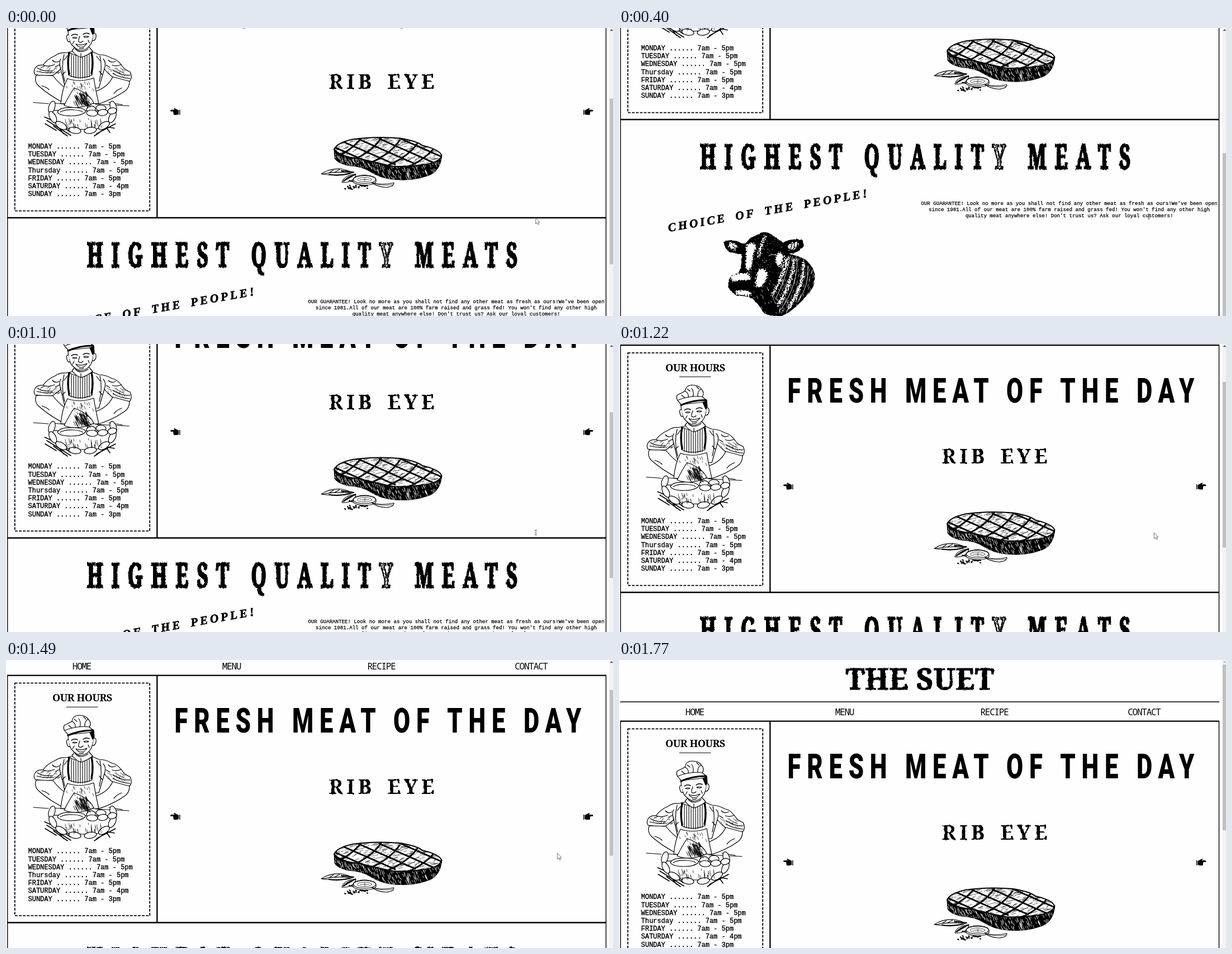
Write an HTML page that moves like this. It is 1086 px wide and 516 px high and loops after 2.5 s.

```html
<!DOCTYPE html>
<html lang="en">
<head>
<meta charset="utf-8">
<title>Butcher shop</title>
<style>
@property --s { syntax: "<number>"; inherits: true; initial-value: 0; }
html, body { margin: 0; width: 100%; height: 100%; overflow: hidden; background: #fefefe; }
svg { display: block; width: 1086px; height: 516px; animation: scroll 2500ms step-end infinite; }
.page { transform: translateY(calc(var(--s) * -1px)); }
.thumb { transform: translateY(calc(var(--s) * .557px)); }
.arrow { animation: arrow 2500ms step-end infinite; }
.beam { animation: beam 2500ms step-end infinite; }
.up { animation: up 2500ms step-end infinite; }

@keyframes scroll {
  0% { --s: 212.5 }
  6% { --s: 318.5 }
  11.2% { --s: 374 }
  16% { --s: 388.5 }
  38.8% { --s: 302.5 }
  44% { --s: 205 }
  48.8% { --s: 107.5 }
  54.4% { --s: 92 }
  59.6% { --s: 82 }
  65.2% { --s: 10 }
  70.8%, 100% { --s: 0 }
}
@keyframes arrow {
  0% { transform: translate(947.5px, 340px); opacity: 1 }
  6% { transform: translate(946.5px, 338px); opacity: 1 }
  11.2% { opacity: 0 }
  48.8% { transform: translate(957.5px, 338px); opacity: 1 }
  54.4% { transform: translate(968px, 341px); opacity: 1 }
  59.6% { transform: translate(986.5px, 346px); opacity: 1 }
  65.2%, 100% { opacity: 0 }
}
@keyframes beam {
  0% { opacity: 0 }
  11.2% { opacity: 1 }
  48.8%, 100% { opacity: 0 }
}
@keyframes up {
  0% { fill: #505050 }
  70.8%, 100% { fill: #b4b4b4 }
}

text { white-space: pre; stroke: #000; stroke-width: 0; }
.title { font: 900 52px "Noto Serif", serif; letter-spacing: .6px; stroke-width: 1; }
.nav { font: 500 16px "Noto Sans Mono", monospace; letter-spacing: -1.25px; }
.head { font: 700 18px "Noto Serif", serif; letter-spacing: -.4px; }
.hours { font: 400 12px "Liberation Mono", monospace; }
.fresh { font: 900 60.5px Roboto, sans-serif; letter-spacing: 15.1px; }
.cut { font: 600 36px "Noto Serif", serif; letter-spacing: 6.2px; word-spacing: 7px; }
.slab { font: 700 60px "Noto Serif", serif; letter-spacing: 26.2px; }
.script { font: italic 700 21px "Liberation Serif", serif; letter-spacing: 4.2px; word-spacing: 6px; }
.note { font: 400 9.125px "Liberation Mono", monospace; }
.hours text { stroke-width: .35; }
.note text { stroke-width: .25; }
.slab { stroke-width: 3.2; }
.script { stroke-width: .7; }
.mid { text-anchor: middle; }
.ink { fill: none; stroke: #000; stroke-linecap: round; stroke-linejoin: round; }
.ink.light, .light { stroke: #fefefe; }
.w { fill: #fefefe; }
.k { fill: #000; }
</style>
</head>
<body>
<svg viewBox="0 0 1086 516">
  <defs>
    <filter id="rough" color-interpolation-filters="sRGB">
      <feTurbulence type="fractalNoise" baseFrequency=".22" numOctaves="2" seed="4"/>
      <feDisplacementMap in="SourceGraphic" scale="4.5" xChannelSelector="R" yChannelSelector="G"/>
    </filter>
    <filter id="worn" color-interpolation-filters="sRGB">
      <feTurbulence type="fractalNoise" baseFrequency=".15" numOctaves="2" seed="9"/>
      <feDisplacementMap in="SourceGraphic" scale="3" xChannelSelector="R" yChannelSelector="G"/>
    </filter>
    <!-- Turns soft shapes into white grain -->
    <filter id="stipple" color-interpolation-filters="sRGB">
      <feGaussianBlur in="SourceGraphic" stdDeviation="3" result="soft"/>
      <feTurbulence type="fractalNoise" baseFrequency=".42" numOctaves="2" seed="3"/>
      <feComposite in="soft" operator="arithmetic" k2="1" k3="1" k4="-.85"/>
      <feColorMatrix values="0 0 0 0 1  0 0 0 0 1  0 0 0 0 1  0 0 0 12 -1"/>
    </filter>
    <pattern id="scribble" width="9" height="7" patternUnits="userSpaceOnUse">
      <rect width="9" height="7" fill="#fefefe"/>
      <path d="M0 6Q4 0 9 4M2 0L5 7" fill="none" stroke="#000" stroke-width="1.3"/>
    </pattern>
    <path id="top" d="M587 430Q592 418 620 412Q660 406 705 410Q735 415 745 423Q775 430 779 440Q778 452 750 457Q715 462 690 460Q660 453 630 446Q600 444 587 430Z"/>
    <path id="side" d="M587 430L588 446Q592 454 612 459Q637 460 652 470Q670 482 695 484Q728 487 755 477Q777 470 780 440Q760 425 690 425Z"/>
    <path id="cow" d="M235 376Q245 372 250 369Q260 362 273 370L294 385Q304 377 327 379Q333 384 329 393Q320 404 304 404Q316 408 330 412Q346 424 350 440Q352 455 346 466Q338 479 322 494Q306 510 290 517Q268 517 258 510Q253 498 238 484Q222 479 212 480Q198 474 196 463Q194 450 202 443L214 438Q221 425 219 405Q205 405 193 398Q187 389 188 384Q195 377 214 383Q224 389 228 384Z"/>
    <clipPath id="ctop"><use href="#top"/></clipPath>
    <clipPath id="cside"><use href="#side"/></clipPath>
    <clipPath id="ccow"><use href="#cow"/></clipPath>
    <path id="hand" class="k" d="M294 361Q294 359 296 359L302 359L300 357Q301 355 303 357L307 359L309 360V367Q305 369 300 368L299 362H295ZM310 359h1.5v9h-1.5z"/>
  </defs>

  <g class="page">
    <g class="ink" style="stroke-linecap:butt">
      <path d="M2 75H1074" stroke-width="1.6"/>
      <path d="M2 109.6H1074M270.3 109V552M2 552.5H1074" stroke-width="2.3"/>
      <path d="M2.7 109V1000M1073.5 109V1000" stroke-width="1.4"/>
      <rect x="15.8" y="123.3" width="241.4" height="416.8" stroke-width="1.8" stroke-dasharray="4.8 2.3"/>
      <path d="M108 166.3H164.5" stroke-width="1"/>
    </g>

    <text class="title mid" x="538.5" y="52.5" filter="url(#worn)">THE SUET</text>
    <g class="nav mid">
      <text x="135.5" y="99">HOME</text>
      <text x="403.5" y="99">MENU</text>
      <text x="671.5" y="99">RECIPE</text>
      <text x="939.5" y="99">CONTACT</text>
    </g>

    <text class="head mid" x="136.5" y="156">OUR HOURS</text>
    <g class="hours" id="hours"></g>

    <g class="ink" id="chef" stroke-width="1.2">
      <path class="w" d="M122 254L107 257Q96 256 88 262Q74 268 66 279Q58 278 53 283Q48 290 52 296Q68 299 84 297Q92 292 98 286L106 320H166L176 286Q182 294 190 300Q206 307 221 308Q227 302 222 291Q212 288 206 278Q198 268 190 267Q178 260 166 260L152 254Z"/>
      <path class="w" d="M54 297Q50 308 58 316Q78 334 106 348L120 342L114 325Q96 314 84 298Z"/>
      <path class="w" d="M221 308Q221 320 212 326Q190 341 164 349L156 340L160 326Q182 319 191 300Z"/>
      <path d="M56 284Q66 291 84 289M55 290Q70 294 84 292M66 279Q76 283 87 278M192 288Q206 298 222 297M191 294Q205 302 222 303M206 278Q198 282 190 279M98 286Q94 274 98 268M176 286Q180 274 174 268M104 260Q98 282 105 308M168 262Q173 284 167 308M83 270Q88 276 95 272M196 272Q188 276 183 270M110 262L104 270M162 263L168 271M88 282L96 278M186 283L179 279M101 296L106 291M172 296L167 290M64 316Q72 318 77 323M207 320Q197 324 193 330"/>
      <path class="w" d="M112 256V297Q131 306 154 297V256Q132 268 112 256Z"/>
      <path stroke-width="1.1" d="M117 260V300M121 262V301M125 262V302M129 263V303M133 263V303M137 263V303M141 263V302M145 262V301M149 260V300"/>
      <path stroke-width="3.4" d="M113 257Q109 275 113 295M153 256Q157 275 153 294"/>
      <path class="w" d="M110 303Q100 322 98 348H166Q160 322 157 302Q132 311 110 303Z"/>
      <path class="w" d="M124 246L118 253Q126 263 134 265Q146 262 155 254L148 246Z"/>
      <path d="M124 250Q133 260 147 250M134 258V265"/>
      <path class="w" d="M111 216Q111 232 117 242Q126 252 134 253Q145 252 152 241Q158 229 157 211Z"/>
      <path class="w" d="M112 225Q107 224 109 232Q111 239 114 237M157 222Q162 221 161 229Q159 236 155 235"/>
      <path class="k" d="M150 212L157 209L158 220L155 224Z"/>
      <path stroke-width="1.6" d="M117 226Q122 222 128 225M138 224Q143 220 149 223"/>
      <path d="M119 230Q123 228 127 230Q123 232 119 230M139 228Q143 226 148 228Q143 231 139 228"/>
      <path d="M132 227Q129 235 130 237Q134 240 138 236M122 236L119 241M147 234L149 239M131 249Q135 251 139 248"/>
      <path class="w" d="M125 241Q134 245 145 240Q140 247 134 247Q128 246 125 241Z"/>
      <path class="w" d="M109 213Q101 207 104 199Q111 196 118 192Q119 182 130 181Q143 181 147 188Q154 195 149 202L155 207Q132 209 111 217Z"/>
      <path d="M118 192Q125 195 124 203M130 187Q135 194 132 202M147 188Q140 192 141 201M106 208Q128 199 149 202M112 199L118 204M122 188L127 192M139 184L143 188"/>
      <path stroke-width="3.2" d="M111 217Q131 208 156 208"/>
      <path d="M49 346L76 348M86 347L106 349M160 349L220 352M184 346L208 350"/>
      <path class="w" d="M84 360Q80 388 118 394H158Q192 388 190 361Z"/>
      <path class="w" d="M122 320Q114 331 104 351Q126 361 157 347Q150 330 122 320Z"/>
      <path class="w" d="M92 363Q96 354 120 355Q144 356 142 363Q135 370 116 370Q96 370 92 363Z"/>
      <path d="M97 363Q106 358 120 359Q134 360 137 363"/>
      <path stroke-width="1.6" d="M69 372L101 386M73 378L116 405M82 374L103 402M85 388L110 406M70 384L90 396M90 381L115 399M162 402L196 384M158 406L181 390M170 388L194 392M176 385L186 400"/>
    </g>
    <g class="ink">
      <path stroke-width=".9" data-h="60,121,326,24,20,5,11"/>
      <path stroke-width=".8" data-h="36,132,330,16,18,6,8"/>
      <path stroke-width=".7" data-h="40,106,374,66,16,1,7"/>
      <path stroke-width=".7" data-h="24,60,282,38,14,5,-4"/>
      <path stroke-width=".7" data-h="24,180,282,36,17,5,4"/>
      <path stroke-width=".7" data-h="18,106,308,50,15,2,6"/>
    </g>

    <text class="fresh" transform="translate(301.5 212) scale(.72 1)">FRESH MEAT OF THE DAY</text>
    <text class="cut" x="577.5" y="321.5" filter="url(#worn)">RIB EYE</text>
    <use href="#hand"/>
    <use href="#hand" transform="translate(1344.5) scale(-1 1)"/>

    <g class="ink">
      <use href="#side" class="k"/>
      <path class="light" clip-path="url(#cside)" stroke-width=".8" data-h="380,586,434,195,52,3,7"/>
      <use href="#top" class="w" stroke-width="2"/>
      <g clip-path="url(#ctop)">
        <path stroke-width=".6" data-h="420,586,408,190,56,9,-3"/>
        <path stroke-width="2.9" id="grill"/>
      </g>
      <g stroke-width="1.1">
        <path class="w" d="M564 474Q578 464 600 465Q612 467 620 472Q600 479 564 474ZM601 489Q604 477 626 474Q626 482 616 487Q608 490 601 489Z"/>
        <path stroke-width="2.2" d="M578 475Q596 478 616 473M604 487Q610 480 625 475M600 468L622 471M614 486L627 489L632 481"/>
        <path d="M566 474Q590 469 616 472M606 486L620 478M578 472L586 467M588 471L597 466M599 471L608 468"/>
        <path class="w" d="M621 484Q622 477 641 476Q661 477 662 484V488Q658 494 641 494Q624 493 621 488Z"/>
        <ellipse cx="641.5" cy="484" rx="20" ry="7"/>
        <ellipse cx="641.5" cy="484" rx="13" ry="4" stroke-width=".7"/>
        <path d="M634 484L649 484M642 481V487" stroke-width=".7"/>
        <path class="w" d="M654 489Q670 495 694 490Q694 497 680 498Q663 497 654 489Z"/>
        <path d="M658 491Q674 496 692 493" stroke-width=".7"/>
      </g>
      <path stroke-width="2" data-h="28,603,494,46,7,2,1"/>
    </g>

    <text class="slab" transform="translate(145 640.5) scale(.58 1)" filter="url(#rough)">HIGHEST QUALIT<tspan fill="url(#scribble)">Y</tspan> MEATS</text>
    <text class="script" transform="translate(89 753.5) rotate(-9.9)">CHOICE OF THE PEOPLE!</text>
    <g class="note mid">
      <text x="805.5" y="705">OUR GUARANTEE! Look no more as you shall not find any other meat as fresh as ours!We've been open</text>
      <text x="805.5" y="716">since 1981.All of our meat are 100% farm raised and grass fed! You won't find any other high</text>
      <text x="805.5" y="727">quality meat anywhere else! Don't trust us? Ask our loyal customers!</text>
    </g>

    <g transform="translate(0 388.5)">
      <use href="#cow" class="k" filter="url(#worn)"/>
      <g clip-path="url(#ccow)">
        <g class="ink light" filter="url(#stipple)">
          <g fill="#fefefe" stroke="none">
            <path d="M200 444Q212 437 232 441L240 452Q222 449 202 455ZM205 472Q220 467 238 474L234 481Q218 476 208 478ZM193 385Q204 383 213 391L208 399Q198 396 193 385ZM302 390Q314 381 325 384Q318 396 304 399Z"/>
            <path d="M228 388Q240 382 246 389Q238 404 238 424L232 438Q225 432 227 412ZM250 432Q262 428 266 442Q260 462 246 468Q242 454 250 432ZM282 402L294 404Q294 420 286 430L280 418Z"/>
          </g>
          <path stroke-width="5" d="M302 410Q294 446 274 480M314 412Q310 456 284 498M330 418Q332 462 302 503M262 372Q252 392 250 412"/>
        </g>
        <g class="ink light">
          <path stroke-width=".9" d="M306 410Q300 446 280 486M319 413Q320 460 290 504M338 426Q341 458 322 488M200 447Q216 441 234 447M268 408Q276 403 283 409"/>
          <path stroke-width=".7" data-h="130,288,408,64,100,-2,7"/>
          <path stroke-width=".8" data-h="110,226,370,66,70,1,1"/>
          <path stroke-width=".7" data-h="60,240,445,60,65,2,4"/>
        </g>
        <g class="ink">
          <path class="k" d="M199 459Q203 454 207 459Q205 465 201 464ZM222 459Q228 453 234 458Q230 464 224 463Z"/>
          <path stroke-width="1.3" d="M203 390L211 396M310 386L307 397M314 384L313 395M320 384L318 392M204 471Q220 466 238 473"/>
          <circle class="k" cx="276" cy="411" r="2.4"/>
        </g>
      </g>
    </g>
  </g>

  <rect x="1079" width="7" height="516" fill="#f3f3f3"/>
  <rect class="thumb" x="1080" y="8" width="6" height="297" fill="#c1c1c1"/>
  <path class="up" d="M1080.5 5L1083.5 2L1086 4.5V5Z"/>
  <path class="arrow" d="M0 0V11L2.5 8.7L4.2 12.3L5.9 11.5L4.3 8H7.4Z" fill="#fff" stroke="#445" stroke-width=".8"/>
  <path class="beam" d="M946 333.5H950M948 333.5V342M946 342H950" fill="none" stroke="#555" stroke-width=".9"/>
</svg>
<script>
const NS = "http://www.w3.org/2000/svg";
const $ = q => document.querySelector(q);

function add(parent, tag, attrs, text = "") {
  const el = document.createElementNS(NS, tag);
  for (const key in attrs) el.setAttribute(key, attrs[key]);
  el.textContent = text;
  parent.append(el);
}

let seed = 7;
const rand = () => (seed = (seed * 16807) % 2147483647) / 2147483647;

// data-h: count, x, y, width, height, stroke dx, stroke dy
for (const el of document.querySelectorAll("[data-h]")) {
  const [n, x, y, w, h, dx, dy] = el.dataset.h.split(",").map(Number);
  let d = "";
  for (let i = 0; i < n; i++) {
    const len = .3 + .7 * rand();
    d += `M${(x + w * rand()).toFixed(1)} ${(y + h * rand()).toFixed(1)}l${(dx * len).toFixed(1)} ${(dy * len).toFixed(1)}`;
  }
  el.setAttribute("d", d);
}

let bars = "";
for (let k = 0; k < 6; k++) bars += `M${638 + 33 * k} ${406 + 4 * k}q-16 24 -52 40`;
for (let k = -1; k < 5; k++) bars += `M${596 + 36 * k} ${413 - k}q36 16 100 44`;
$("#grill").setAttribute("d", bars);

// Chain of sausages around the bowl
const chef = $("#chef");
const link = (x, y, turn, rx = 11) =>
  add(chef, "ellipse", { class: "w", rx, ry: 5.5, transform: `translate(${x} ${y}) rotate(${turn})` });
for (let i = 0; i < 8; i++) {
  const a = Math.PI * (1.06 - i * .16);
  const x = 137 + 56 * Math.cos(a), y = 361 + 36 * Math.sin(a);
  link(x, y, Math.atan2(-36 * Math.cos(a), 56 * Math.sin(a)) * 180 / Math.PI);
}
link(152, 358, -8, 8);
link(170, 356, 4, 9);
link(154, 365, 3, 10);
link(173, 364, -5, 9);
link(190, 361, -12, 8);

[
  ["MONDAY", 5], ["TUESDAY", 5], ["WEDNESDAY", 5], ["Thursday", 5],
  ["FRIDAY", 5], ["SATURDAY", 4], ["SUNDAY", 3]
].forEach(([day, end], i) =>
  add($("#hours"), "text", { x: 39.5, y: 428.4 + i * 14.2 }, `${day} ...... 7am - ${end}pm`));
</script>
</body>
</html>
```
